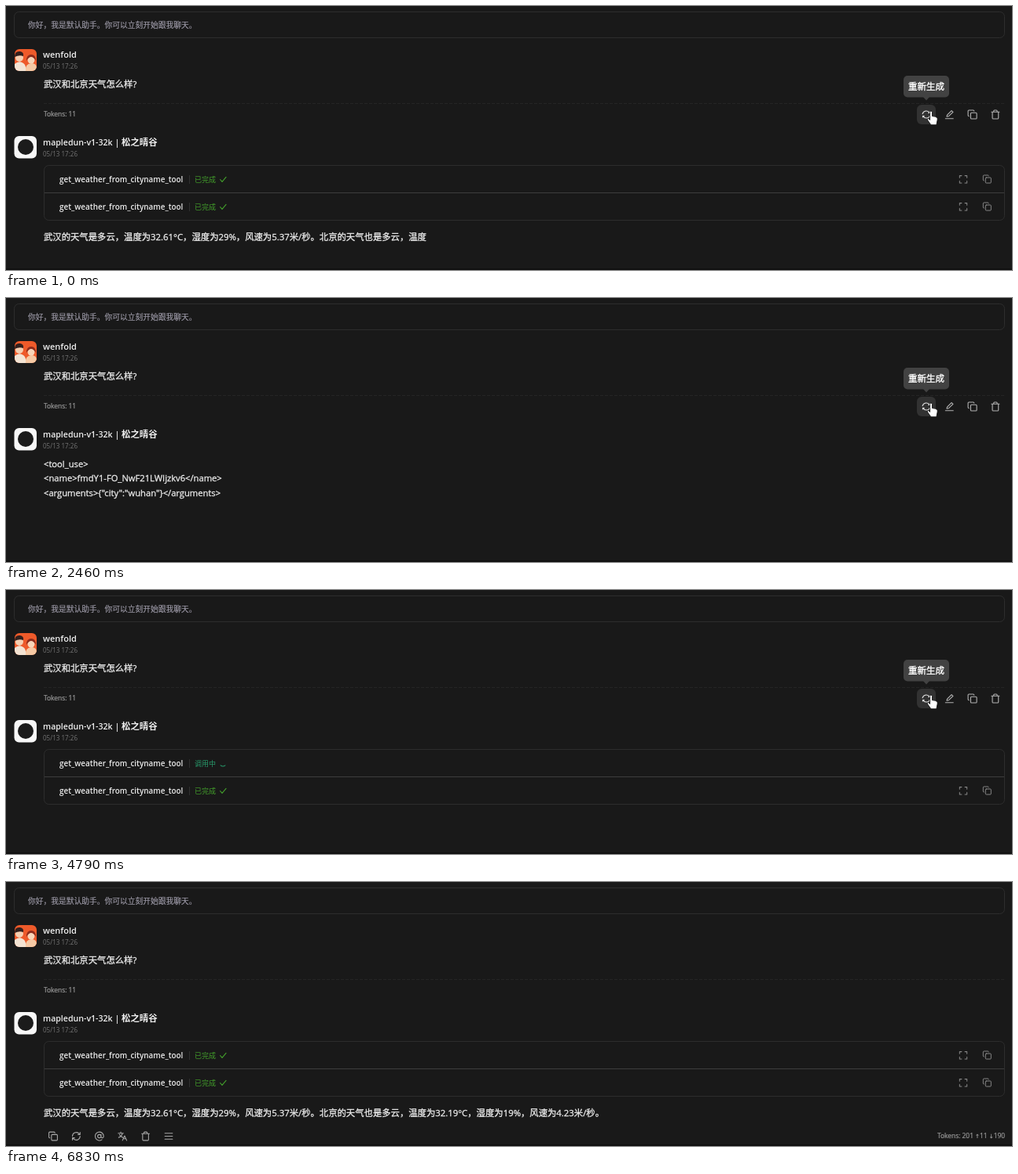
These frames come from a looping animation (1280 px wide and 337 px high, 8.58 s). An HTML page:

```html
<!DOCTYPE html>
<html lang="zh-CN">
<head>
<meta charset="utf-8">
<title>Chat</title>
<style>
html, body { margin: 0; width: 100%; height: 100%; overflow: hidden; background: #191919; }
svg { display: block; width: 1280px; height: 337px; }
text { font-family: "Open Sans", "Noto Sans CJK SC", "Noto Sans CJK", sans-serif; white-space: pre; }
.name { font-weight: 600; font-size: 11px; fill: #f0f0f0; }
.date { font-size: 8.05px; fill: #747474; }
.body, .code { fill: #ececec; stroke: #ececec; stroke-width: .3px; }
.body { font-size: 11.35px; }
.code { font-size: 11.2px; }
.tokens { font-size: 8.4px; fill: #989898; stroke: #989898; stroke-width: .22px; }
.greeting { font-size: 9.75px; fill: #a19eac; stroke: #a19eac; stroke-width: .12px; }
.tooltip { font-size: 11.5px; fill: #fff; stroke: #fff; stroke-width: .35px; }
.tool { font-weight: 600; font-size: 9.9px; fill: #ececec; }
.status { font-size: 9px; }
.line { fill: none; stroke: #2d2d2d; }
.icon { fill: none; stroke-width: 2; stroke-linecap: round; stroke-linejoin: round; }
</style>
</head>
<body>
<svg viewBox="0 0 1280 337">
  <rect width="1280" height="337" fill="#191919"/>
  <rect y="335" width="1280" height="2" fill="#111"/>
  <rect class="line" x="10.5" y="7.5" width="1260" height="33" rx="6"/>
  <text class="greeting" x="28" y="27.5">你好，我是默认助手。你可以立刻开始跟我聊天。</text>

  <clipPath id="round"><rect x="11" y="55" width="28" height="28" rx="6"/></clipPath>
  <g clip-path="url(#round)">
    <rect x="11" y="55" width="28" height="28" fill="#ee5a2a"/>
    <path d="M11 83v-9q7-6 13 1l3 8z" fill="#f3e3d3"/>
    <path d="M25 83q-1-9 7-10 6 0 7 5v5z" fill="#f6c9a4"/>
    <circle cx="17" cy="66" r="5" fill="#f5cfb1"/>
    <path d="M11 65q0-8 7-7 5 1 4 6-5-2-11 1z" fill="#33201d"/>
    <circle cx="32" cy="69" r="4.5" fill="#f7d5b8"/>
    <path d="M26 70q0-8 6-8t6 8q-3-5-6-5t-6 5z" fill="#8d2c1c"/>
  </g>
  <text class="name" x="47" y="66">wenfold</text>
  <text class="date" x="47" y="80">05/13 17:26</text>
  <text class="body" x="48" y="104">武汉和北京天气怎么样?</text>
  <path d="M48 124.5H1271" stroke="#252525" stroke-dasharray="4 2"/>
  <text class="tokens" x="48" y="141">Tokens: 11</text>

  <g id="actions">
    <rect x="1159" y="126" width="24" height="25" rx="6" fill="#323232"/>
  </g>
  <g id="tip">
    <path d="M1166 115h10l-5 5.5z" fill="#424242"/>
    <rect x="1142" y="89" width="58" height="27.5" rx="5" fill="#424242"/>
    <text class="tooltip" x="1148" y="107">重新生成</text>
  </g>

  <rect x="10.5" y="166" width="28.5" height="28.5" rx="6" fill="#f7f7f7"/>
  <circle cx="25" cy="180" r="10" fill="#1b1b1b"/>
  <text class="name" x="47" y="177.5" style="font-size:10.6px">mapledun-v1-32k | <tspan font-size="11.4">松之晴谷</tspan></text>
  <text class="date" x="47" y="191.5">05/13 17:26</text>

  <g id="loader"></g>
  <g id="code"></g>
  <g id="panel">
    <rect class="line" x="48.5" y="203.5" width="1222" height="70" rx="6"/>
    <path d="M49 238.5H1270" stroke="#3d3d3d"/>
  </g>
  <text id="answer" class="body" x="48" y="299"></text>
  <g id="footer">
    <text class="tokens" x="1271" y="327" text-anchor="end">Tokens: 201 <tspan class="arrow">↑</tspan>11 <tspan class="arrow">↓</tspan>190</text>
  </g>
  <path id="hand" fill="#fff" stroke="#111" stroke-width=".9" stroke-linejoin="round"
    d="M0 0q1.5 0 1.5 1.6v5q4.5.3 6 1.8 1 .9.6 3l-1.2 6.4h-7l-4.2-6q-1.2-2.2.7-2.2l2.2 1.8V1.6Q-1.4 0 0 0z"/>
</svg>
<script>
const LOOP = 8580;
const $ = id => document.getElementById(id);
const clamp = v => Math.min(1, Math.max(0, v));
const svg = (parent, tag, attrs, text = "") => {
  const el = document.createElementNS("http://www.w3.org/2000/svg", tag);
  for (const key in attrs) el.setAttribute(key, attrs[key]);
  el.textContent = text;
  return parent.appendChild(el);
};
const show = (el, on) => el.setAttribute("visibility", on ? "inherit" : "hidden");
const fade = (el, value) => el.setAttribute("opacity", value);

const ICONS = {
  sync: "M3.2 10.5a9 9 0 0 1 16.6-2M20.8 13.5a9 9 0 0 1-16.6 2M20.4 5.8l-.5 3-2.8-.6M3.6 18.2l.5-3 2.8.6",
  refresh: "M3 12a9 9 0 0 1 15-6.7L21 8M21 3v5h-5M21 12a9 9 0 0 1-15 6.7L3 16M3 21v-5h5",
  edit: "M6 17l1-4L17 3l3.5 3.5L10.5 16zM3 21.5h18",
  copy: "M10 8h10a2 2 0 0 1 2 2v10a2 2 0 0 1-2 2H10a2 2 0 0 1-2-2V10a2 2 0 0 1 2-2zM4 16a2 2 0 0 1-2-2V4a2 2 0 0 1 2-2h10a2 2 0 0 1 2 2",
  trash: "M3 6h18M19 6v14a2 2 0 0 1-2 2H7a2 2 0 0 1-2-2V6M8 6V4a2 2 0 0 1 2-2h4a2 2 0 0 1 2 2v2",
  at: "M16 12a4 4 0 1 1-8 0 4 4 0 0 1 8 0zM16 8v5a3 3 0 0 0 6 0v-1a10 10 0 1 0-4 8",
  translate: "M2 5h12M8 2v3M12 5c-1 5-5 9-9 10M5 8c1 3 4 6 8 7M12 22l5-11 5 11M14 18h6",
  menu: "M3 5h18M3 12h18M3 19h18",
  expand: "M8 3H3v5M16 3h5v5M8 21H3v-5M16 21h5v-5"
};
const icon = (parent, name, x, y, scale, stroke) => svg(parent, "path", {
  class: "icon", d: ICONS[name], stroke,
  transform: `translate(${x} ${y}) scale(${scale}) translate(-12 -12)`
});

["sync", "edit", "copy", "trash"].forEach((name, i) =>
  icon($("actions"), name, 1171 + i * 29.3, 138.5, .55, i ? "#b4b4b4" : "#e4e4e4"));
["copy", "refresh", "at", "translate", "trash", "menu"].forEach((name, i) =>
  icon($("footer"), name, 60 + i * 29.4, 324.5, .54, "#a8a8a8"));
document.querySelectorAll(".arrow").forEach(el =>
  el.setAttribute("style", "font: 7px 'DejaVu Sans', sans-serif"));

icon($("loader"), "sync", 0, 0, .55, "#dedede");
const codeLines = [0, 1, 2, 3].map(i =>
  svg($("code"), "text", { class: "code", x: 48, y: 216 + i * 18.4 }));

const makeRow = (y, doneAt) => {
  const row = $("panel");
  svg(row, "text", { class: "tool", x: 68, y: y + 3.6 }, "get_weather_from_cityname_tool");
  svg(row, "path", { d: `M233.5 ${y - 5}v11`, stroke: "#303030" });
  const busy = svg(row, "g", {});
  const done = svg(row, "g", {});
  svg(busy, "text", { class: "status", x: 240, y: y + 4, fill: "#27996a" }, "调用中");
  const spinner = svg(busy, "path", {
    class: "icon", d: "M2.9 2.9A4.1 4.1 0 0 1-2.9 2.9", stroke: "#27996a", style: "stroke-width:1"
  });
  svg(done, "text", { class: "status", x: 240, y: y + 4, fill: "#43a02b" }, "已完成");
  svg(done, "path", {
    class: "icon", d: `M272.5 ${y + .5}l2.5 2.8 5-6`, stroke: "#43a02b", style: "stroke-width:1.1"
  });
  icon(done, "expand", 1218, y + .3, .52, "#858585");
  icon(done, "copy", 1248.3, y, .5, "#858585");
  return { y, doneAt, busy, done, spinner };
};
const rows = [makeRow(221, 5460), makeRow(256, 4400)];

const call = city => [
  "<tool_use>",
  "<name>fmdY1-FO_NwF21LWIjzkv6</name>",
  `<arguments>{"city":"${city}"}</arguments>`,
  "<"
];
// [time, city, visible lines]
const CODE = [[0, "", 0], [2250, "wuhan", 2], [2460, "wuhan", 3], [3080, "beijing", 1],
  [3180, "beijing", 2], [3290, "beijing", 4], [3420, "", 0]];

const ANSWER = "武汉的天气是多云，温度为32.61°C，湿度为29%，风速为5.37米/秒。" +
  "北京的天气也是多云，温度为32.19°C，湿度为19%，风速为4.23米/秒。";
const upTo = (part, from = 0) => ANSWER.indexOf(part, from) + part.length;
const second = ANSWER.indexOf("北京");
// [time, visible characters]
const TYPING = [
  [0, upTo("温度", second)], [40, upTo("湿度为", second)], [125, ANSWER.length], [1330, 0],
  [5960, upTo("天气")], [6090, upTo("32.61")], [6170, upTo("风速为5.")],
  [6380, upTo("多云，", second)], [6580, upTo("温度", second)],
  [6660, upTo("湿度为", second)], [6750, ANSWER.length]
];
const stepAt = (steps, t) => steps.filter(step => step[0] <= t).pop();

function draw(t) {
  show($("loader"), t >= 1330 && t < 2250);
  const spin = (Math.min(t, 2170) - 1330) * .36;
  $("loader").setAttribute("transform", `translate(54 212) rotate(${spin})`);

  const [, city, count] = stepAt(CODE, t);
  const lines = call(city);
  codeLines.forEach((el, i) => el.textContent = i < count ? lines[i] : "");

  const panelOn = t < 1330 || t >= 3420;
  show($("panel"), panelOn);
  for (const { y, doneAt, busy, done, spinner } of rows) {
    const running = t >= 3420 && t < doneAt;
    show(busy, panelOn && running);
    show(done, panelOn && !running);
    spinner.setAttribute("transform", `translate(276 ${y}) rotate(${(t - 4790) * .36})`);
  }

  $("answer").textContent = ANSWER.slice(0, stepAt(TYPING, t)[1]);
  show($("footer"), t >= 210 && t < 1330 || t >= 6830);

  fade($("actions"), 1 - clamp((t - 5800) / 200));
  fade($("tip"), 1 - clamp((t - 5900) / 150));
  const move = Math.max(0, t - 5750);
  $("hand").setAttribute("transform", `translate(${1177 + move * .015} ${134 + move * .69})`);
  show($("hand"), t < 6050);
}

const start = performance.now();
function tick() {
  draw((performance.now() - start) % LOOP);
  requestAnimationFrame(tick);
}
tick();
</script>
</body>
</html>
```
